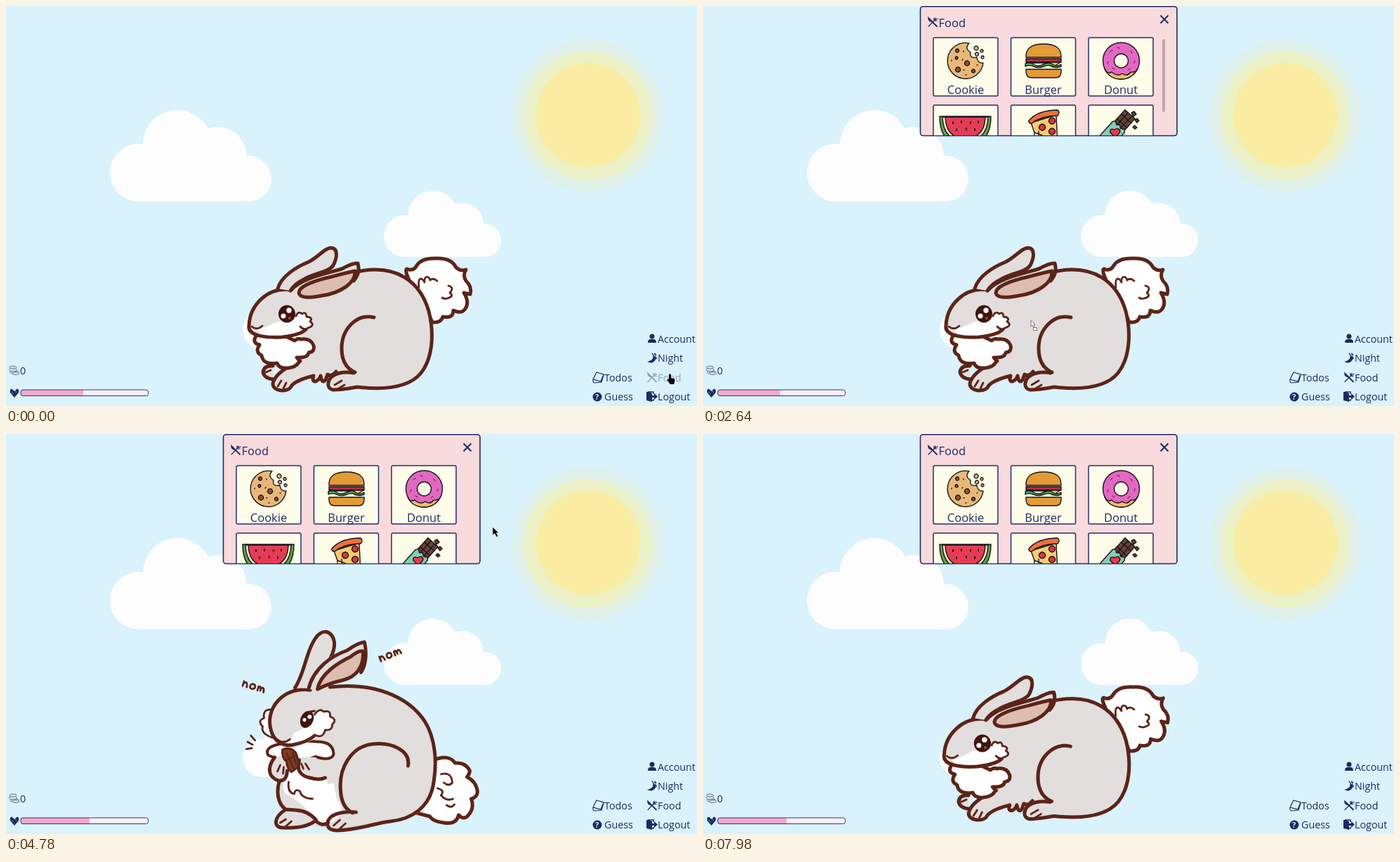
Recreate the animation shown at these times as an HTML page. Size 984 px wide and 569 px high, loop 8000 ms.

```html
<!DOCTYPE html>
<html lang="en">
<head>
<meta charset="utf-8">
<title>Bunny feeding</title>
<style>
html, body { margin: 0; width: 100%; height: 100%; overflow: hidden; background: #d9f2fc; }
svg { display: block; width: 984px; height: 569px; font-family: "Open Sans", "Noto Sans", sans-serif; }
.ink { stroke: #5c2418; stroke-width: 5; stroke-linecap: round; stroke-linejoin: round; fill: none; }
.thin { stroke-width: 2.8; }
.fur { fill: #e2dedd; }
.white { fill: #fefefe; }
.pink { fill: #ddbdb2; }
.flat { stroke: none; }
.menu { font-size: 14.3px; fill: #1b2b63; }
.food { font-size: 16.5px; fill: #1b2b63; }
.line { fill: none; stroke: #1b2b63; stroke-width: 1.5; }
.snack { stroke: #17131c; stroke-width: 1.4; stroke-linejoin: round; stroke-linecap: round; }
.card { fill: #fdfdea; stroke: #252f68; stroke-width: 1.5; }
</style>
</head>
<body>
<svg viewBox="0 0 984 569">
  <defs>
    <g id="cloud" fill="#fdfdfd">
      <circle cx="41" cy="89" r="41"/><circle cx="96" cy="49" r="49"/>
      <circle cx="153" cy="66" r="42"/><circle cx="197.500" cy="97.500" r="32.500"/>
      <path d="M41 60H190V130H41z"/>
    </g>
    <g id="utensils" class="line" stroke-linecap="round">
      <path d="M-5-5L6 6" stroke-width="1.800"/><path d="M-6-6Q-6-2-2-1z" fill="#1b2b63"/>
      <path d="M-6 6L3-3M2-6V-3L3-2H6M4-6L3-3L7-5" style="stroke-width:1.200"/>
    </g>
    <path id="nom" class="ink thin" d="M-15-3V4M-15 0Q-10-6-9 4M-1-3C-6-3-6 5-1 4C4 3 3-3-1-3M7-2V4M7 0Q10-6 11 3M11 0Q15-5 16 4"/>
    <clipPath id="inside"><path d="M310 1H675V184H310z"/></clipPath>
  </defs>

  <rect width="984" height="569" fill="#d9f2fc"/>
  <g>
    <circle cx="829" cy="156" r="107.500" fill="#dff1e8"/>
    <circle cx="829" cy="156" r="92" fill="#edf1c8"/>
    <circle cx="829" cy="155" r="74.500" fill="#f8eda2"/>
    <circle cx="829" cy="155" r="62" fill="#faeba0"/>
  </g>
  <use href="#cloud" x="148" y="148"/>
  <use href="#cloud" transform="translate(538 262.500) scale(.727)"/>
  <use href="#cloud" transform="translate(337 402) scale(.66)"/>

  <g id="idle" class="ink">
    <path class="white" d="M575 392Q567 375 571 374Q580 378 585 369Q592 358 613 359Q634 358 641 372Q648 378 655 375Q650 383 655 391Q664 399 661 410Q656 409 652 408Q661 422 653 432Q648 438 637 433Q637 445 622 442Q620 451 607 450L590 410z"/>
    <path class="thin" d="M588 400C586 386 592 385 596 393C595 384 602 383 604 390Q608 386 614 391M630 398Q639 400 632 408Q639 413 628 416Q624 417 621 415"/>
    <path class="fur flat" d="M400 405C440 387 490 374 525 374C580 375 607 420 607 468C607 502 592 532 565 540C525 548 495 542 468 546L460 535L470 522L438 527L404 544L384 544L382 532L415 505L430 485L420 470z"/>
    <path d="M500 378C557 366 590 393 602 434C611 470 606 503 591 522C573 544 535 546 500 542C488 544 478 546 466 546C455 544 458 531 466 526Q477 519 495 522"/>
    <path d="M524 443C500 437 478 459 478 487Q478 513 497 521"/>
    <path class="thin" d="M468 539L478 533M472 545L482 539"/>
    <path class="fur" d="M380 512Q367 511 366 521Q368 530 381 531"/>
    <path class="thin" d="M370 521L377 518"/>
    <path class="fur" d="M419 505C400 513 383 524 380 537C380 549 400 549 405 543C408 535 422 530 438 526Q435 534 441 534Q447 531 448 526Q450 538 455 532L458 524Q464 528 470 520"/>
    <path class="thin" d="M387 541L392 533M395 544L399 536"/>
    <path class="white" d="M357 468Q349 479 361 482Q354 492 364 497Q366 511 386 508Q389 516 401 515Q414 514 418 505L414 500Q430 501 431 493Q440 492 438 483Q434 472 420 474Q416 472 411 476L390 466z"/>
    <path class="fur flat" d="M390 403C365 406 348 429 347 452C343 470 371 472 396 471Q422 468 432 455L440 420L410 402z"/>
    <path class="white flat" d="M354 459C374 460 381 447 396 448Q408 449 414 440L434 445L431 459C415 470 390 471 365 468z"/>
    <path d="M406 404C373 399 347 425 346 455C344 471 376 472 393 471C410 469 421 466 427 460"/>
    <path class="white thin" d="M413 441Q416 433 422 438Q427 434 428 442Q438 443 433 449Q441 454 430 458Q424 462 419 456"/>
    <path class="thin" d="M350 456Q357 462 365 455"/>
    <path class="fur" d="M387 402C392 384 414 371 431 364C445 357 454 344 463 344C474 345 471 359 466 369C459 379 438 380 424 389Q411 395 405 405"/>
    <path class="fur flat" d="M410 400L500 367L497 390L440 416z"/>
    <path d="M406 404C421 387 455 381 478 374Q494 365 501 366Q505 380 495 391"/>
    <path class="pink" d="M417 408C417 397 446 389 464 385Q486 379 497 377C498 394 477 408 450 412C430 416 418 415 417 408z"/>
    <g class="flat"><ellipse cx="400" cy="438" rx="12" ry="12.500" fill="#43130d"/>
      <circle cx="403" cy="433" r="3.700" fill="#fff"/><circle cx="395" cy="441" r="3.500" fill="#fff"/><circle cx="404" cy="444" r="2" fill="#8d4c3c"/></g>
  </g>

  <g id="eating">
    <g class="ink">
      <path class="white" d="M610 463C622 457 634 458 640 467Q655 466 661 478Q660 484 657 487Q670 493 672 508Q671 516 663 518Q668 531 659 541Q653 549 645 541Q642 555 624 552Q608 550 604 543L585 538z"/>
      <path class="thin" d="M620 483Q635 479 636 495Q631 501 624 495M615 503Q626 506 620 513Q628 522 637 518M639 526Q635 532 628 527"/>
      <path class="fur flat" d="M420 362C470 351 530 356 568 378C604 405 617 450 609 498C601 534 584 546 555 550L500 558L462 561L395 550L386 515L389 478z"/>
      <path class="white flat" d="M392 476L450 486Q459 488 458 497L467 496L472 519L476 525Q483 541 463 552L445 551Q420 520 397 510z"/>
      <path d="M462 359C520 352 572 370 597 408C612 432 614 465 610 491C606 531 577 547 548 550C522 553 505 562 472 563C456 563 455 551 464 543Q477 535 499 537"/>
      <path d="M573 471C577 449 549 437 523 440C491 443 474 476 477 506Q478 530 494 538M441 549Q451 558 459 552"/>
      <path class="thin" d="M467 556L476 548M475 561L484 553"/>
      <path class="fur" d="M391 489C384 508 388 526 399 533C380 545 382 559 394 559C418 560 434 556 442 548Q431 535 413 534L399 533"/>
      <path class="thin" d="M391 552L399 547M399 557L407 550M403 494Q401 509 411 511Q412 503 419 507Q421 517 437 518"/>
      <path class="white" stroke-width="4" d="M386 441Q368 446 374 456L384 460L414 461Q427 464 441 458Q463 465 467 455Q467 439 449 437L419 435z"/>
      <path class="fur flat" d="M384 458L376 480L390 492L402 480L418 464L420 480L434 488L455 487L442 459z"/>
      <path d="M383 459C371 475 375 487 388 492Q400 494 401 478M418 463C414 478 420 485 433 488Q447 492 455 488"/>
      <path class="thin" d="M387 479L391 470M395 482L396 473M424 475L421 468M432 476L427 468"/>
      <path fill="#7b3c22" class="thin" d="M394 448Q405 443 413 452Q417 460 417 472L407 480Q400 474 400 465Q393 460 394 448z"/>
      <path stroke-width="2" d="M400 453L410 475M409 452L414 470M399 463L412 457"/>
      <path class="white thin" d="M377 391Q366 391 368 403Q358 407 366 415Q363 425 380 431"/>
      <path class="fur flat" d="M417 361C388 367 373 388 377 414C379 434 396 443 407 441Q440 434 446 408L448 365z"/>
      <path class="white flat" d="M397 439Q408 434 411 424Q431 416 443 402L461 400L458 421Q431 442 403 443z"/>
      <path d="M434 363C394 359 371 389 377 417C381 438 397 444 410 441Q430 437 440 428"/>
      <path class="white thin" d="M440 398Q447 388 453 394Q463 391 462 401Q473 405 465 412Q466 421 455 420Q452 433 440 427"/>
      <path class="thin" d="M386 433Q396 441 405 433"/>
      <path class="fur" d="M412 360C426 339 428 306 443 287C456 272 470 285 468 301C465 323 446 340 434 361"/>
      <path class="fur flat" d="M431 362C440 327 466 307 510 296L508 334L446 364z"/>
      <path d="M431 363C438 331 466 314 486 307Q502 296 511 295C515 313 512 330 506 338"/>
      <path class="pink" d="M444 362C448 340 474 324 491 316Q503 306 509 308C510 330 500 344 481 349Q462 353 444 362z"/>
      <g class="flat" transform="rotate(24 429 405)"><ellipse cx="429" cy="405" rx="9" ry="12.500" fill="#43130d"/>
        <circle cx="431" cy="400" r="3" fill="#fff"/><circle cx="426" cy="407" r="2.600" fill="#fff"/></g>
      <path class="thin" d="M433 394L440 393"/>
    </g>
    <path id="chew" class="ink thin" d="M345 430L353 434M344 440L352 441M346 450L353 446"/>
    <use href="#nom" id="nomLeft"/><use href="#nom" id="nomRight"/>
  </g>

  <g id="panel">
    <rect x="309.500" y=".75" width="365.500" height="183.750" rx="4" fill="#f9dadd" stroke="#1f2a66" stroke-width="1.600"/>
    <use href="#utensils" x="327" y="23"/>
    <text class="food" x="335.500" y="30">Food</text>
    <path class="line" style="stroke-width:2" d="M651.500 13.500L662.500 24.500M662.500 13.500L651.500 24.500"/>
    <g id="cards" clip-path="url(#inside)"></g>
    <g class="snack">
      <path fill="#e9b878" d="M379 53A25.500 25.500 0 1 0 399 81Q391 82 390 73Q379 75 381 66Q372 60 379 53z"/>
      <path fill="#8a5735" d="M362 61a2.500 2.500 0 1 0 .1 0M376 78a3.500 3.500 0 1 0 .1 0M363 87a3.500 3.500 0 1 0 .1 0M385 90a2.500 2.500 0 1 0 .1 0M361 72a2 2 0 1 0 .1 0"/>
      <path d="M371 64v1M370 76l-1 1M354 77v1M374 98h1M371 91h1M390 84h1"/>
      <path fill="#e9b878" d="M389 57a3 3 0 1 0 .1 0M397 62a2 2 0 1 0 .1 0M390 66a2.500 2.500 0 1 0 .1 0M398 71a2 2 0 1 0 .1 0"/>

      <path fill="#e49b35" d="M460 73Q459 54 485 54Q511 54 510 73z"/>
      <path fill="#b52b43" d="M460 75H510V80H460z"/>
      <path fill="#eed151" d="M461 80H509L498 87L490 81H461z"/>
      <path fill="#58b64b" d="M459 82Q465 79 471 83T485 83T498 83T510 83V86Q504 89 498 86T485 86T471 86T459 86z"/>
      <path fill="#e49b35" d="M460 90H510Q511 102 502 102H468Q459 102 460 90z"/>

      <circle cx="595.500" cy="78" r="26" fill="#e368c1"/>
      <path fill="#f1bd67" d="M572 90Q576 97 582 94Q590 101 597 96Q604 101 609 94Q616 95 619 89Q611 104 595.500 104Q579 104 572 90z"/>
      <circle cx="595.500" cy="78" r="10" fill="#fdfdea"/>
      <path d="M580 65l3-2M577 79l-1 3M590 59l3 1M609 64l2 3M615 78l-1 3M583 88l3 2M605 91l3-2" stroke="#7a327d"/>
      <g clip-path="url(#inside)">
        <path fill="#65a441" d="M337 157H410Q410 198 373.500 198T337 157z"/>
        <path fill="#fdf1ce" d="M341 158H406Q405 192 373.500 192T341 158z"/>
        <path fill="#e53c55" d="M345 158H402Q401 188 373.500 188T345 158z"/>
        <path d="M356 165v2M368 164v2M381 165v2M392 164v2M361 175v2M375 174v2M387 175v2" stroke-width="2"/>
        <path fill="#f5ce70" d="M467 166L503 155L505 198L490 191L483 184L472 180z"/>
        <path fill="#ee703c" d="M464 163Q477 148 505 148Q509 151 505 156Q482 156 468 167Q463 167 464 163z"/>
        <path fill="#dc3342" d="M483 168a4.500 4.500 0 1 0 .1 0M497 159a4.500 4.500 0 1 0 .1 0M497 174a4.500 4.500 0 1 0 .1 0"/>
        <path d="M472 180v6M478 178v9"/>
        <g transform="rotate(42 597 167)">
          <path fill="#654333" d="M587 150H606V176H587z"/><path d="M593 150V176M600 150V176M587 158H606M587 167H606"/>
          <path fill="#88cbb5" d="M585 174L588 171L592 174L596 171L600 174L605 171L608 174V204H585z"/>
        </g>
        <path fill="#e83d4b" d="M586 186L580 180Q579 173 586 176Q592 172 594 178Q593 183 586 186z"/>
      </g>
      <path fill="#654333" d="M610 152l4-2 3 4-4 3zM615 162l3-2 3 3-3 3zM612 172l3-2 3 3-3 2z"/>
    </g>
    <rect id="scroll" x="654" y="47" width="4" height="104" rx="2" fill="#c3a5b2"/>
  </g>

  <g class="menu">
    <g id="labels"></g>
    <circle cx="920" cy="470" r="3.500"/><path d="M914 479Q914 474 918 474H922Q926 474 926 479z"/>
    <path d="M919 493Q926 503 913 506Q921 510 925 503Q928 497 919 493zM924 493l1 2 2 1-2 1-1 2-1-2-2-1 2-1zM926 499l1 2-1 2-1-2z"/>
    <path class="line" style="stroke-width:1.200" d="M841 521L851 524L847 534L836 531zM836 531Q835 536 839 536L848 535L851 525"/>
    <circle cx="842" cy="556" r="6.500"/><text x="839" y="560" style="font-size:11px;font-weight:700;fill:#d9f2fc">?</text>
    <path d="M912 549H916L920 551V563L912 561z"/>
    <path class="line" d="M914 549H922V552M922 559V561H919"/><path d="M920 554H923V551L928 555.500L923 560V557H920z"/>
    <g id="foodItem"><use href="#utensils" x="920" y="528.500"/><text x="928" y="534">Food</text></g>
    <path id="focus" fill="none" stroke="#8296a6" stroke-dasharray="1 1" d="M908.500 514.500H964.500V542.500H908.500z"/>
    <g fill="#d4e2ea" stroke="#66758f"><ellipse cx="12" cy="521" rx="6" ry="2.500"/><ellipse cx="10" cy="517.500" rx="5.500" ry="2.500"/><ellipse cx="10" cy="514" rx="5" ry="2"/><ellipse cx="14" cy="522.500" rx="5" ry="2"/></g>
    <text x="20" y="524">0</text>
    <path d="M12 557L6 550Q5 544 9 545L12 548L15 545Q19 544 18 550z"/><path d="M8 549l3 3M13 547l2 3" stroke="#7f93b5"/>
    <rect x="21" y="546" width="181.500" height="8.500" rx="3" fill="#fbf0f7"/>
    <rect id="health" x="21" y="546" height="8.500" rx="2" fill="#f3a8cf"/>
    <rect x="21" y="546" width="181.500" height="8.500" rx="3" fill="none" stroke="#3b3275"/>
  </g>

  <g id="cursor">
    <path id="arrow" stroke="#fff" stroke-width=".7" d="M0 0V12L3 9.500L5.500 14.500L8 13L5.500 8.500H9z"/>
    <path id="drag" fill="#fff" stroke="#777" d="M0 0V9L2 7L4 11L5 10L4 6H6zM3.500 10.500H8.500V14.500H3.500z"/>
    <path id="hand" d="M-1 0Q1-2 2 1V5L6 6Q8 7 7 11L6 14H1L-3 9Q-4 6-1 7z"/>
  </g>
</svg>
<script>
const LOOP = 8000, POSE = 400, OPEN = 420, GRAB = 1900, DROP = 2900, FULL = 7520;
const $ = id => document.getElementById(id);
const show = (id, on) => $(id).style.display = on ? "" : "none";
const place = (id, transform) => $(id).setAttribute("transform", transform);

$("labels").innerHTML = [["Account", 928, 479], ["Night", 928, 506], ["Todos", 852, 534],
  ["Guess", 852, 561], ["Logout", 928, 561]]
  .map(([text, x, y]) => `<text x="${x}" y="${y}">${text}</text>`).join("");
$("cards").innerHTML = ["Cookie", "Burger", "Donut"].map((name, i) => {
  const x = 328 + i * 110.5;
  const card = y => `<rect class="card" x="${x}" y="${y}" width="92" height="83" rx="2"/>`;
  return card(45) + card(141) + `<text class="food" text-anchor="middle" x="${x + 46}" y="124.500">${name}</text>`;
}).join("");

// Each row is time, then the values reached at that time.
const cursorPath = [[0, 945, 524], [500, 945, 524], [1300, 446, 117], [1450, 446, 117], [1800, 594, 160],
  [2000, 594, 160], [2550, 467, 447], [3000, 467, 447], [4000, 708, 128], [4600, 708, 128],
  [5400, 592, 160], [5900, 592, 160], [6400, 603, 163], [8000, 603, 163]];
const scrollFade = [[0, 0], [1300, 0], [1650, 1], [3100, 1], [3500, 0], [5000, 0], [5300, 1], [6200, 1], [6500, 0], [8000, 0]];

function sample(track, time) {
  const i = track.findIndex(row => row[0] > time);
  const a = track[i - 1], b = track[i];
  const p = (time - a[0]) / (b[0] - a[0]), eased = p * p * (3 - 2 * p);
  return a.slice(1).map((value, k) => value + (b[k + 1] - value) * eased);
}

function draw(now) {
  const t = now % LOOP;
  const second = Math.floor(t / POSE) % 2 === 1;
  const eating = t >= DROP && t < FULL;
  show("idle", !eating);
  show("eating", eating);
  place("idle", second ? "translate(-6.500 1) rotate(-.3 600 440) scale(1.011 1)" : "");
  place("eating", second ? "translate(-.5 1)" : "");
  place("chew", second ? "rotate(22 352 440)" : "");
  place("nomLeft", second ? "translate(353 358) rotate(17)" : "translate(367 332) rotate(-25)");
  place("nomRight", second ? "translate(547 313) rotate(-22)" : "translate(568 349) rotate(12)");

  show("panel", t >= OPEN);
  show("focus", t >= OPEN && t < GRAB);
  $("foodItem").style.opacity = t < OPEN ? .4 : 1;
  $("scroll").style.opacity = sample(scrollFade, t)[0];
  $("health").setAttribute("width", t < DROP ? 89 : 98);

  const dragging = t >= GRAB && t < DROP;
  show("hand", t < 560);
  show("drag", dragging);
  show("arrow", t >= 560 && !dragging);
  show("cursor", t < 7500);
  place("cursor", `translate(${sample(cursorPath, t)})`);
}

const start = performance.now();
function tick() {
  draw(performance.now() - start);
  requestAnimationFrame(tick);
}
tick();
</script>
</body>
</html>
```
